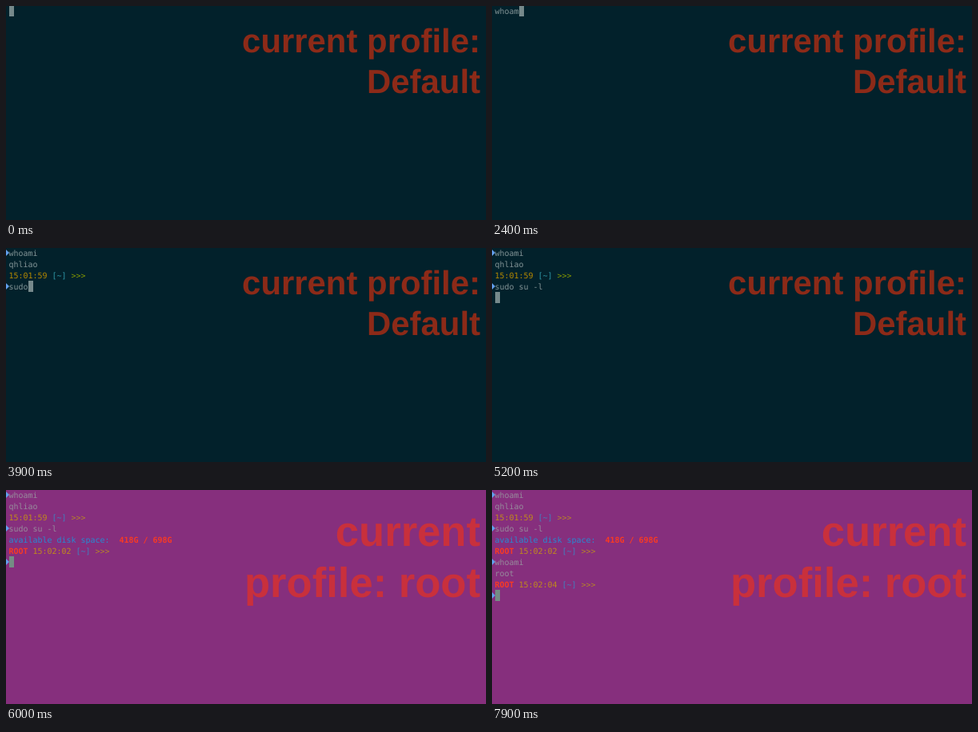
An HTML page for the animation above (8000 ms loop, 600 by 268 pixels).

```html
<!DOCTYPE html>
<html lang="en">
<head>
<meta charset="utf-8">
<title>Terminal profile switching</title>
<style>
  html, body { margin: 0; width: 100%; height: 100%; overflow: hidden; }
  body {
    --bg: #02212b; --badge: #8c2a18; --text: #839496; --cursor: #76898b;
    --time: #b58900; --path: #2f98a8; --arrow: #859900;
    background: var(--bg);
  }
  body.root {
    --bg: #862f7d; --badge: #c9303c; --text: #968c9c; --cursor: #748d84;
    --time: #c08a1c; --path: #417fc0; --arrow: #b5822a;
  }
  svg { display: block; width: 600px; height: 268px; }
  .term { font: 9.97px "DejaVu Sans Mono", "Liberation Mono", monospace; fill: var(--text); text-rendering: geometricPrecision; }
  .term text { white-space: pre; }
  .time { fill: var(--time); }
  .path { fill: var(--path); }
  .arrow { fill: var(--arrow); }
  .info { fill: #268bd2; }
  .alert { fill: #f83a24; font-weight: bold; }
  .mark { fill: #62a0ee; }
  #cursor { fill: var(--cursor); }
  .badge { font: bold 41.9px "Liberation Sans", Arial, sans-serif; fill: var(--badge); text-anchor: end; text-rendering: geometricPrecision; }
  .badge.big { font-size: 52.6px; }
  .root .normal, body:not(.root) .big { display: none; }
</style>
</head>
<body>
<svg viewBox="0 0 600 268">
  <g class="badge normal">
    <text x="593" y="58.2">current profile:</text>
    <text x="593" y="108.8">Default</text>
  </g>
  <g class="badge big">
    <text x="593" y="69.5">current</text>
    <text x="593" y="134">profile: root</text>
  </g>
  <g class="term" id="term"></g>
  <rect id="cursor" width="6" height="14"/>
</svg>
<script>
const LOOP = 8000, ROOT_AT = 5400;
const LEFT = 4, CELL = 6, LINE = 14;

// time, row, text on that row; the cursor follows the text
const typing = [
  [0, 0, ''],
  [2000, 0, 'w'], [2100, 0, 'wh'], [2200, 0, 'who'], [2300, 0, 'whoa'],
  [2400, 0, 'whoam'], [2600, 0, 'whoami'],
  [2800, 1, ''], [2900, 2, ''], [3100, 3, ''],
  [3600, 3, 's'], [3700, 3, 'su'], [3900, 3, 'sudo'], [4000, 3, 'sudo '],
  [4400, 3, 'sudo su'], [4500, 3, 'sudo su '], [4700, 3, 'sudo su -'], [5000, 3, 'sudo su -l'],
  [5200, 4, ''], [5900, 5, ''], [6000, 6, ''],
  [6600, 6, 'w'], [6800, 6, 'wh'], [6900, 6, 'who'], [7000, 6, 'whoa'],
  [7100, 6, 'whoam'], [7300, 6, 'whoami'],
  [7500, 7, ''], [7700, 9, '']
];

const span = (cls, text) => `<tspan class="${cls}">${text}</tspan>`;
const prompt = clock => span('time', clock) + ' ' + span('path', '[~]') + ' ' + span('arrow', '&gt;&gt;&gt;');
const rootPrompt = clock => span('alert', 'ROOT') + ' ' + prompt(clock);

// time, row, markup
const output = [
  [2900, 1, 'qhliao'],
  [3000, 2, prompt('15:01:59')],
  [5900, 4, span('info', 'available disk space:') + '  ' + span('alert', '418G / 698G')],
  [6000, 5, rootPrompt('15:02:02')],
  [7700, 7, 'root'],
  [7700, 8, rootPrompt('15:02:04')]
];

// time, row
const marks = [[2800, 0], [3100, 3], [6000, 6], [7700, 9]];

const term = document.getElementById('term');
const cursor = document.getElementById('cursor');

function add(tag, attrs, html = '') {
  const el = document.createElementNS('http://www.w3.org/2000/svg', tag);
  for (const key in attrs) el.setAttribute(key, attrs[key]);
  el.innerHTML = html;
  return term.appendChild(el);
}
const addLine = (row, html) => add('text', { x: LEFT - 0.5, y: row * LINE + 10 }, html);

const timed = [
  ...output.map(([at, row, html]) => ({ at, el: addLine(row, html) })),
  ...marks.map(([at, row]) => ({
    at, el: add('path', { class: 'mark', d: `M0 ${row * LINE + 2}l4 4l-4 4z` })
  }))
];
const inputs = new Map(marks.map(([, row]) => [row, addLine(row, '')]));

let shown = -1;
function draw(t) {
  const tick = Math.floor(t / 100);
  if (tick === shown) return;
  shown = tick;

  document.body.classList.toggle('root', t >= ROOT_AT);
  for (const { at, el } of timed) el.style.display = t >= at ? '' : 'none';

  const past = typing.filter(([at]) => at <= t);
  for (const [row, el] of inputs) {
    const last = past.filter(step => step[1] === row).pop();
    el.textContent = last ? last[2] : '';
  }
  const [, row, text] = past[past.length - 1];
  cursor.setAttribute('x', LEFT + text.length * CELL);
  cursor.setAttribute('y', row * LINE - 1);
}

const start = performance.now();
function frame(now) {
  draw(Math.max(0, now - start) % LOOP);
  requestAnimationFrame(frame);
}
draw(0);
requestAnimationFrame(frame);
</script>
</body>
</html>
```
